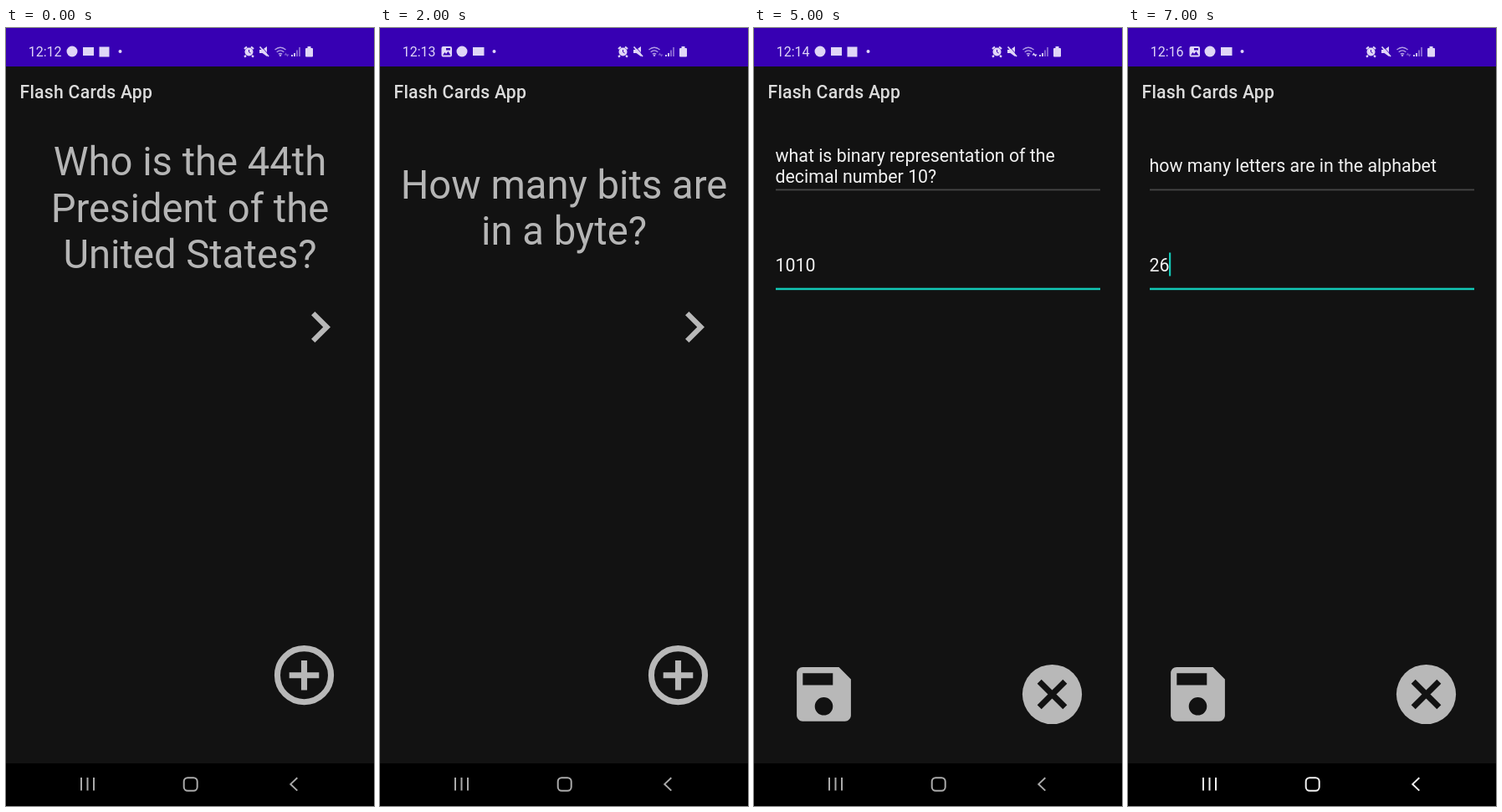
Animation of 440 by 930 pixels, one loop 8 s. Source, as an HTML page:

```html
<!DOCTYPE html>
<html lang="en">
<head>
<meta charset="utf-8">
<title>Flash Cards App</title>
<style>
  html, body { margin: 0; width: 100%; height: 100%; overflow: hidden; background: #121212; }
  svg { display: block; width: 440px; height: 930px; font-family: Roboto, sans-serif; }
  .title { font-size: 21.2px; font-weight: 500; letter-spacing: .0125em; fill: #dcdcdc; }
  .clock { font-size: 16px; }
  .card { font-size: 47.2px; text-anchor: middle; fill: #b5b5b5; }
  .field { font-size: 21.35px; fill: #f2f2f2; }
  .status { fill: #e0d6f7; }
  .icon { fill: #b8b8b8; }
  .line { fill: none; stroke: currentColor; }
</style>
</head>
<body>
<svg viewBox="0 0 440 930">
  <rect width="440" height="930" fill="#121212"/>
  <rect width="440" height="46" fill="#3700b3"/>

  <g class="status" color="#e0d6f7">
    <text id="clock" class="clock" x="26.7" y="34.4"></text>
    <g id="chatIcons">
      <circle cx="79" cy="28" r="6.5"/>
      <rect x="92" y="23" width="13" height="10"/>
      <rect x="111.5" y="22.5" width="12" height="12"/>
    </g>
    <g id="photoIcons">
      <path fill-rule="evenodd" d="M75.5 22h8.500q2 0 2 2v8.500q0 2-2 2h-8.500q-2 0-2-2V24q0-2 2-2zM75 32.500h9.500l-3-4.500-2.500 3-1.500-2zM79 24v2.500h5V24z"/>
      <circle cx="98" cy="28" r="6.5"/>
      <rect x="111" y="23" width="13.5" height="10"/>
    </g>
    <circle cx="136.5" cy="28" r="2"/>

    <circle cx="290.5" cy="28.5" r="5"/>
    <path class="line" stroke-width="2.2" d="M285 25l3-2.500M296 25l-3-2.500M287 33l-2 1.500M294 33l2 1.500"/>
    <path class="line" style="stroke:#3700b3" stroke-width="1" d="M290.5 26v2.700l2 1.200"/>
    <path d="M303 26h3.500l5.500-4v12l-5.500-4h-3.500z"/>
    <path class="line" style="stroke:#3700b3" stroke-width="1" d="M304.500 21.500l10.500 11.500"/>
    <path class="line" stroke-width="1.8" d="M303.500 22.500l10.500 11.500"/>
    <g opacity=".75">
      <path class="line" stroke-width="1.3" d="M321.500 26q6.500-5.500 13 0M323.700 28.700q4.300-3.600 8.600 0M325.800 31.200q2.200-1.800 4.400 0"/>
      <circle cx="328" cy="32.8" r="1.3"/>
    </g>
    <path id="wifi" d="M332.500 32.500l2-3 2 3zM334.500 31.500h4l-2 3z"/>
    <path class="line" stroke-width="1.8" d="M342 34v-2M345 34v-4"/>
    <path class="line" stroke-width="1.8" opacity=".5" d="M348 34v-7.500M351 34v-11"/>
    <path d="M360.500 22h4v2h1.500q1 0 1 1v8.500q0 1-1 1h-7q-1 0-1-1V25q0-1 1-1h1.500z"/>
  </g>

  <text class="title" x="16.5" y="84.2">Flash Cards App</text>

  <g id="deck">
    <g id="card" class="card"></g>
    <path class="icon" transform="translate(338.4 320.3) scale(3.1)" d="M10 6 8.590 7.410 13.170 12l-4.580 4.590L10 18l6-6z"/>
    <g transform="translate(356.5 773.7) scale(3.56)" color="#b8b8b8">
      <circle class="line" r="9" stroke-width="2"/>
      <path class="line" stroke-width="2" d="M-5 0H5M0-5V5"/>
    </g>
  </g>

  <g id="form">
    <g id="question" class="field"></g>
    <rect x="26" y="192.5" width="388" height="1.8" fill="#464646"/>
    <text id="answer" class="field" x="25.5" y="290.5"></text>
    <rect id="caret" x="49" y="268.5" width="2.2" height="28" fill="#12c9b7"/>
    <rect x="26" y="310.7" width="388" height="2.5" fill="#12c9b7"/>
    <path class="icon" fill-rule="evenodd" transform="translate(40.3 753.2) scale(3.6)" d="M17 3H5c-1.110 0-2 .9-2 2v14c0 1.100.89 2 2 2h14c1.100 0 2-.9 2-2V7zM12 19a3 3 0 1 1 0-6 3 3 0 0 1 0 6zM15 9H5V5h10z"/>
    <g transform="translate(356.5 796.5) scale(3.56)" color="#121212">
      <circle class="icon" r="10"/>
      <path class="line" stroke-width="2" d="M-4.300-4.300 4.300 4.300M4.300-4.300-4.300 4.300"/>
    </g>
  </g>

  <rect y="879" width="440" height="51" fill="#000"/>
  <g id="nav">
    <path class="line" stroke-width="2" d="M90 896v15.500M97.500 896v15.500M105 896v15.500"/>
    <rect class="line" stroke-width="2" x="212.7" y="896.2" width="16" height="15.6" rx="4.5"/>
    <path class="line" stroke-width="2" d="M348.300 896.200l-8 7.700 8 7.700"/>
  </g>
</svg>
<script>
const $ = id => document.getElementById(id);
const STEP = 1000;

const bits = ["How many bits are", "in a byte?"];
const binary = ["what is binary representation of the", "decimal number 10?"];

const steps = [
  { clock: "12:12", chat: true, card: ["Who is the 44th", "President of the", "United States?"] },
  { clock: "12:13", wifi: true, bright: true, question: ["How many bits are in a byte?"], answer: "8" },
  { clock: "12:13", card: bits },
  { clock: "12:13", wifi: true, card: bits },
  { clock: "12:13", card: ["8"] },
  { clock: "12:14", chat: true, wifi: true, question: binary, answer: "1010" },
  { clock: "12:15", bright: true, question: binary, answer: "1010" },
  { clock: "12:16", bright: true, question: ["how many letters are in the alphabet"], answer: "26", caret: true }
];

const show = (id, on) => { $(id).style.display = on ? "" : "none"; };

// Stacks lines so the block stays centred on a fixed middle baseline.
function setLines(id, lines, x, middle, gap) {
  $(id).replaceChildren(...lines.map((line, i) => {
    const text = document.createElementNS("http://www.w3.org/2000/svg", "text");
    text.setAttribute("x", x);
    text.setAttribute("y", middle + (i - (lines.length - 1) / 2) * gap);
    text.textContent = line;
    return text;
  }));
}

function render(s) {
  $("clock").textContent = s.clock;
  show("chatIcons", s.chat);
  show("photoIcons", !s.chat);
  $("wifi").style.opacity = s.wifi ? 1 : 0.4;
  $("nav").style.color = s.bright ? "#f2f2f2" : "#aaa";
  show("deck", s.card);
  show("form", s.question);
  show("caret", s.caret);
  if (s.card) {
    setLines("card", s.card, 220, 231.5, 55.3);
  } else {
    setLines("question", s.question, 25.5, 172.3, 25);
    $("answer").textContent = s.answer;
  }
}

let current = -1;
const start = performance.now();

function tick() {
  const index = Math.floor((performance.now() - start) / STEP) % steps.length;
  if (index !== current) render(steps[current = index]);
  requestAnimationFrame(tick);
}
tick();
</script>
</body>
</html>
```
